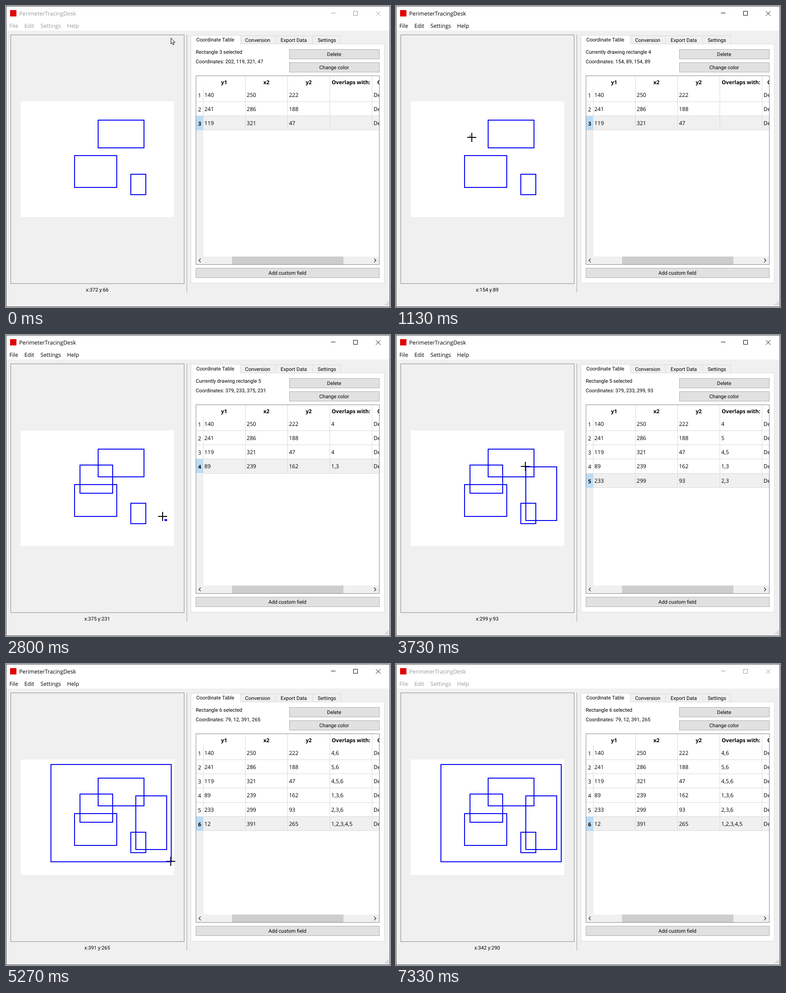
These frames come from a looping animation (846 by 662 pixels, 7.47 s). An HTML page:

```html
<!DOCTYPE html>
<html lang="en">
<head>
<meta charset="utf-8">
<title>PerimeterTracingDesk</title>
<style>
  html, body { margin: 0; width: 100%; height: 100%; overflow: hidden; background: #f0f0f0; }
  svg { display: block; text-rendering: geometricPrecision; }
  text { white-space: pre; }
  .ui { font: 12.2px "Open Sans", "Noto Sans", sans-serif; }
  .head { font: bold 11.75px "Open Sans", "Noto Sans", sans-serif; }
  .small { font: 11.1px Roboto, "Liberation Sans", sans-serif; }
  .mid { text-anchor: middle; }
</style>
</head>
<body>
<svg id="stage" width="846" height="662" viewBox="0 0 846 662">
  <defs><clipPath id="cells"><rect x="419" y="154" width="403" height="397"/></clipPath></defs>
  <g id="base"></g>
  <g id="live"></g>
  <rect x=".5" y=".5" width="845" height="661" fill="none" stroke="#4d4d4d"/>
</svg>
<script>
const LOOP = 7470, STEP = 200 / 3;
const LINE = '#d9d9d9', BLUE = '#0000f5';

// Corner coordinates as shown in the table: x1, y1, x2, y2
const rects = [
  [140, 140, 250, 222], [325, 241, 286, 188], [202, 119, 321, 47],
  [154, 89, 239, 162], [379, 233, 299, 93], [79, 12, 391, 265]
];
// Steps at which each new rectangle is pressed and released
const drags = [[17, 27], [41, 56], [68, 79]];
const ACTIVE_FROM = 16, ACTIVE_TO = 110;

// Mouse path: step, x, y in drawing coordinates
const path = [
  [0, 390, -166.2], [10, 111, 71], [16, 154, 89], [17, 160.3, 93.5],
  [26, 239, 162], [30, 239, 162], [40, 379, 233], [41, 375, 231], [42, 370, 223.4],
  [52, 299, 93], [57, 299, 93], [67, 79, 12], [68, 81, 14], [69, 90.8, 23.9],
  [76, 391, 265], [94, 391, 265], [97, 412.4, 216.3], [98, 398, 240],
  [100, 342, 290], [104, 118, 518], [105, 95, 570]
];

const toX = x => 31.9 + .849 * x;
const toY = y => 210.8 + .847 * y;

const box = (x, y, w, h, fill, stroke = 'none') =>
  `<rect x="${x}" y="${y}" width="${w}" height="${h}" fill="${fill}" stroke="${stroke}"/>`;
const text = (x, y, s, cls = 'ui', fill = '#000') =>
  `<text x="${x}" y="${y}" class="${cls}" fill="${fill}">${s}</text>`;
const stroke = (d, color, width = 1) =>
  `<path d="${d}" fill="none" stroke="${color}" stroke-width="${width}"/>`;
const button = (x, y, w, label) =>
  box(x + .5, y + .5, w, 21, '#e1e1e1', '#adadad') + text(x + w / 2, y + 15, label, 'small mid');

function drawBase() {
  let s = box(0, 0, 846, 662, '#f0f0f0') + box(0, 0, 846, 54, '#fff');
  s += box(9, 9, 14, 14, '#e00000');
  s += box(10.5, 63.5, 382, 547, '#f0f0f0', '#828790') + box(32, 210, 338.5, 254, '#fff');
  s += stroke('M398.5 63V630', '#a0a0a0');

  s += box(407.5, 83.5, 426, 526, '#fff', LINE);
  [[516, 77, 'Conversion', 554.5], [593, 82, 'Export Data', 634], [675, 62, 'Settings', 707]]
    .forEach(([x, w, label, mid]) => {
      s += box(x + .5, 65.5, w, 18, '#f0f0f0', LINE) + text(mid, 79, label, 'small mid');
    });
  s += box(407, 64, 110, 21, '#fff') + stroke('M407.5 85V64.5H516.5V83.5', LINE);
  s += text(461, 78, 'Coordinate Table', 'small mid');
  s += button(624, 95, 198, 'Delete') + button(624, 124, 198, 'Change color');
  s += button(418, 576, 404, 'Add custom field');

  s += box(418.5, 153.5, 404, 415, '#fff', '#828790');
  s += box(419, 551, 403, 17, '#f0f0f0') + box(498, 551, 245.5, 17, '#cdcdcd');
  s += stroke('M429 555.5L425 559.5 429 563.5M811 555.5L815 559.5 811 563.5', '#444', 1.6);

  for (let i = 0; i < 3; i++)
    for (let j = 0; j <= i; j++)
      s += box(841 - 3 * j, 650 + 3 * i + (i > 2 ? 1 : 0), 2, 2, '#bfbfbf');
  document.getElementById('base').innerHTML = s;
}

function mouseAt(n) {
  let i = 0;
  while (i < path.length - 2 && path[i + 1][0] <= n) i++;
  const [n0, x0, y0] = path[i], [n1, x1, y1] = path[i + 1];
  let k = Math.max(0, Math.min(1, (n - n0) / (n1 - n0)));
  if (n1 - n0 > 2) k = k * k * (3 - 2 * k);
  return [x0 + (x1 - x0) * k, y0 + (y1 - y0) * k];
}

const inside = ([x, y]) => x >= 0 && x <= 400 && y >= 0 && y <= 300;

// Position reported by the drawing area: one step late, kept while outside
function reported(n) {
  for (let k = n - 1; k >= 0; k--) {
    const p = mouseAt(k);
    if (inside(p)) return p.map(Math.round);
  }
  return [372, 66];
}

const span = (a, b) => [Math.min(a, b), Math.max(a, b)];
function overlap(a, b) {
  return [0, 1].every(i => {
    const [p, q] = span(a[i], a[i + 2]), [r, s] = span(b[i], b[i + 2]);
    return p < s && r < q;
  });
}

function outline([x1, y1, x2, y2]) {
  const [l, r] = span(x1, x2).map(v => Math.round(toX(v)));
  const [t, b] = span(y1, y2).map(v => Math.round(toY(v)));
  return `<rect x="${l}" y="${t}" width="${Math.max(r - l, .01)}" height="${Math.max(b - t, .01)}" ` +
    `fill="none" stroke="${BLUE}" stroke-width="2"/>`;
}

function windowBar(active) {
  const c = active ? '#000' : '#999';
  let s = text(29, 21, 'PerimeterTracingDesk', 'ui', c);
  [[7.5, 'File'], [40.5, 'Edit'], [76, 'Settings'], [134.5, 'Help']]
    .forEach(([x, label]) => { s += text(x, 48, label, 'ui', c); });
  return s + stroke('M716 15.5H726M765.5 11.5H774.5V20.5H765.5ZM815 11.5L825 21.5M825 11.5L815 21.5', c);
}

function table(shown) {
  const edge = i => Math.floor(179 + 31.3 * i);
  const end = edge(shown.length);
  let s = box(419, end + 1, 16, 550 - end, '#f0f0f0');
  shown.forEach((r, i) => {
    const last = i === shown.length - 1, y = edge(i), mid = Math.round(y + 21);
    if (last) s += box(435, y + 1, 387, 31, '#f0f0f0') + box(419, y + 1, 16, 31, '#bcdcf4');
    s += stroke(`M${last ? 435 : 419} ${edge(i + 1) + .5}H822`, LINE);
    s += text(426.5, mid + 1, i + 1, last ? 'head mid' : 'ui mid');
    const hits = shown.map((o, j) => j !== i && overlap(r, o) ? j + 1 : 0).filter(Boolean);
    [r[1], r[2], r[3], hits.join(','), 'Default'].forEach((v, j) => {
      s += text(437 + 93.2 * j, mid, v);
    });
  });
  [527.5, 620.5, 713.5, 806.5].forEach(x => { s += stroke(`M${x} 154V${end}`, LINE); });
  s += stroke(`M434.5 179V${end}`, LINE);
  ['y1', 'x2', 'y2', 'Overlaps with:'].forEach((h, i) => {
    s += text(480.5 + 93.2 * i, 171.5, h, 'head mid');
  });
  return `<g clip-path="url(#cells)">${s}${text(818, 171.5, 'Color', 'head')}</g>`;
}

function cursor(n) {
  const p = mouseAt(n), x = Math.round(toX(p[0])), y = Math.round(toY(p[1]));
  if (inside(p)) {
    const cx = Math.round(toX(p[0]) - 1), cy = Math.round(toY(p[1]) - 1);
    return stroke(`M${cx - 10} ${cy}h20M${cx} ${cy - 10}v20`, '#000', 2);
  }
  return `<path transform="translate(${x} ${y})" d="M.5 .5V13.5L3.4 10.8 5.4 15.5 7.4 14.6 5.4 10H9.5Z" fill="#fff" stroke="#000"/>`;
}

function draw(n) {
  const shown = rects.slice(0, 3 + drags.filter(d => n >= d[1]).length);
  const held = drags.findIndex(d => n >= d[0] && n < d[1]);
  const at = reported(n);
  let status = `Rectangle ${shown.length} selected`, coords = rects[shown.length - 1];
  let shapes = shown.map(outline).join('');
  if (held >= 0) {
    status = `Currently drawing rectangle ${held + 4}`;
    coords = [...rects[held + 3].slice(0, 2), ...at];
    shapes += outline(coords);
  }
  document.getElementById('live').innerHTML =
    windowBar(n >= ACTIVE_FROM && n < ACTIVE_TO) +
    text(418, 105, status, 'small') +
    text(418, 125.5, 'Coordinates: ' + coords.join(', '), 'small') +
    text(201, 628, `x:${at[0]} y:${at[1]}`, 'small mid') +
    table(shown) + (n < 105 ? cursor(n) : '') + shapes;
}

// Steps begin on whole hundredths of a second
const startOf = n => Math.round(n * STEP / 10) * 10;
function stepAt(t) {
  const n = Math.round(t / STEP);
  return startOf(n) > t ? n - 1 : n;
}

let current = -1;
function tick(now) {
  const n = stepAt(now % LOOP);
  if (n !== current) draw(current = n);
  requestAnimationFrame(tick);
}
drawBase();
draw(0);
const begin = performance.now();
requestAnimationFrame(function run(now) {
  tick.call(null, Math.max(0, now - begin));
});
</script>
</body>
</html>
```
